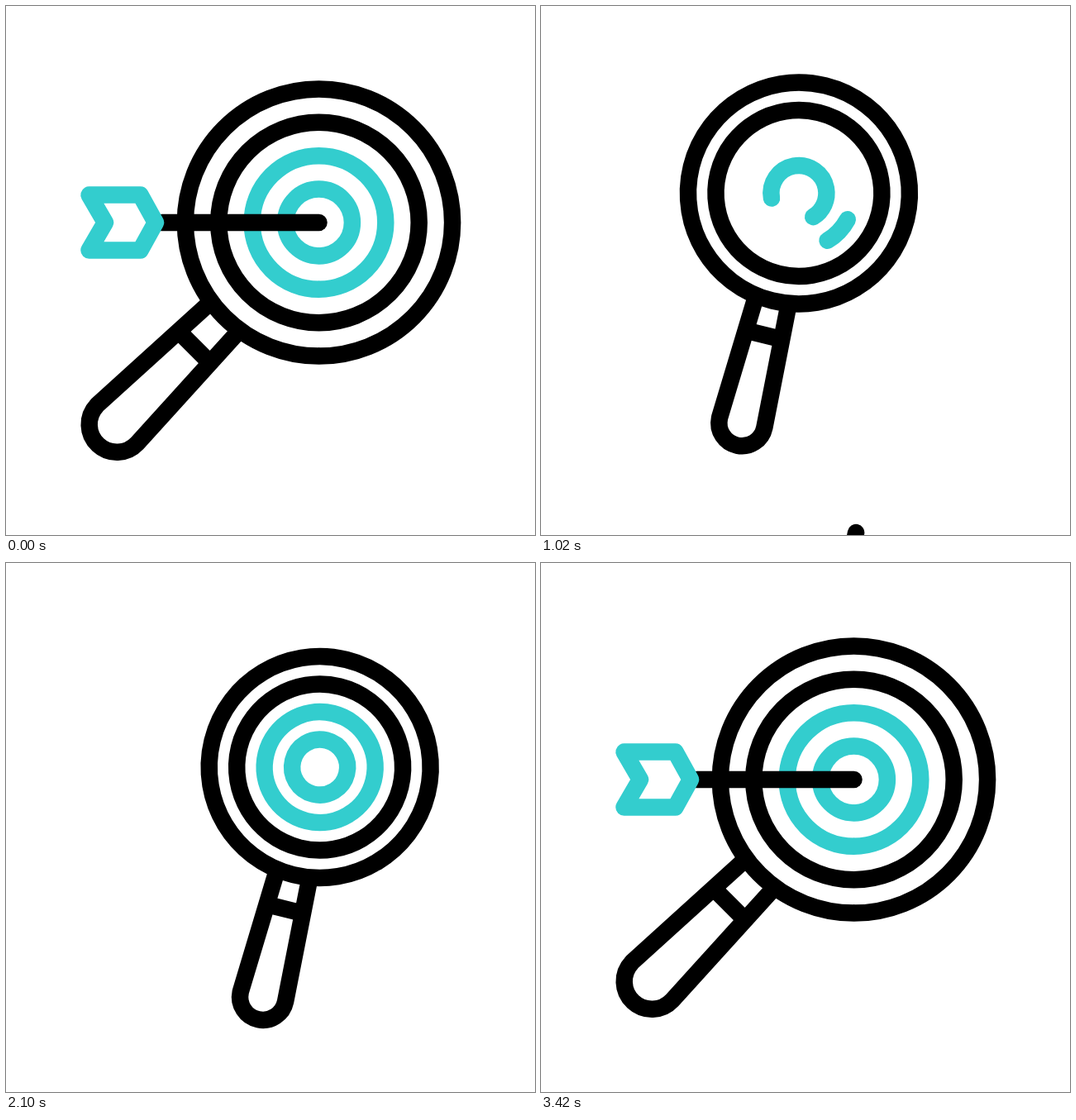
An HTML page with a canvas for the animation above (3.6 s loop, 640 px wide and 640 px high).

```html
<!DOCTYPE html>
<html lang="en">
<head>
<meta charset="utf-8">
<title>Magnifier and arrow</title>
<style>
  html, body { margin: 0; width: 100%; height: 100%; overflow: hidden; background: #fff; }
  canvas { display: block; }
</style>
</head>
<body>
<canvas id="stage" width="640" height="640"></canvas>
<script>
const ctx = document.getElementById('stage').getContext('2d');
const LOOP = 3600, BLACK = '#000', TEAL = '#33cdce', RAD = Math.PI / 180;
const REST = { x: 378.5, y: 262 };

// Key points of the lens centre, joined by a smooth curve
const route = [
  { t: 200, ...REST },
  { t: 480, x: 363.5, y: 235 },
  { t: 1020, x: 312, y: 226.5 },
  { t: 1300, x: 303, y: 207.5 },
  { t: 1660, x: 357, y: 189.5 },
  { t: 2020, x: 385, y: 239 },
  { t: 2540, x: 328.5, y: 277.5 },
  { t: 3040, x: 364, y: 260 },
  { t: 3400, ...REST }
];

// Eased progress from 0 to 1 between two times
function ease(t, from, to) {
  const u = Math.min(1, Math.max(0, (t - from) / (to - from)));
  return u * u * (3 - 2 * u);
}

function slope(i, axis) {
  const a = route[i - 1], b = route[i + 1];
  return a && b ? (b[axis] - a[axis]) / (b.t - a.t) : 0;
}

function along(t, axis) {
  const i = route.findIndex(p => p.t > t) - 1;
  if (i < 0) return REST[axis];
  const a = route[i], b = route[i + 1], d = b.t - a.t, u = (t - a.t) / d;
  const bend = slope(i, axis) * (1 - u) - slope(i + 1, axis) * u;
  return a[axis] + (b[axis] - a[axis]) * ease(t, a.t, b.t) + d * u * (1 - u) * bend;
}

function stroke(color, path, cap = 'round') {
  ctx.strokeStyle = color;
  ctx.lineCap = cap;
  ctx.beginPath();
  path();
  ctx.stroke();
}

function line(color, x1, y1, x2, y2, cap) {
  stroke(color, () => { ctx.moveTo(x1, y1); ctx.lineTo(x2, y2); }, cap);
}

// Part of a ring, measured clockwise from its lowest point
function ring(color, r, from = 0, to = 1) {
  if (to - from < 0.001) return;
  stroke(color, () => ctx.arc(0, 0, r, (90 + 360 * from) * RAD, (90 + 360 * to) * RAD));
}

// A ring that is wiped away and then drawn again
function wipedRing(t, r, start, middle, end) {
  if (t < middle) ring(TEAL, r, ease(t, start, middle), 1);
  else ring(TEAL, r, 0, ease(t, middle, end));
}

function drawLens(t) {
  const size = 1 - 0.171 * (ease(t, 200, 800) - ease(t, 2600, 3200));
  const turn = -31.1 * (ease(t, 200, 770) - ease(t, 2600, 3260));
  const unit = 40.4 * size;
  ctx.save();
  ctx.translate(along(t, 'x'), along(t, 'y'));
  ctx.rotate(turn * RAD);
  ring(BLACK, 4 * unit);
  ring(BLACK, 3 * unit);
  wipedRing(t, 2 * unit, 200, 1200, 1840);
  wipedRing(t, unit, 800, 1400, 1980);

  // Handle, pointing down in its own frame
  ctx.rotate(45 * RAD);
  stroke(BLACK, () => {
    ctx.moveTo(24.5 * size, 160 * size);
    ctx.arc(0, 345.5 * size, 33.5 * size, -2 * RAD, 182 * RAD);
    ctx.lineTo(-24.5 * size, 160 * size);
  }, 'butt');
  line(BLACK, -26 * size, 213 * size, 26 * size, 213 * size, 'butt');
  ctx.restore();
}

// The arrow's tip is the origin
function drawArrow(t) {
  const leave = ease(t, 400, 1200), enter = ease(t, 2800, 3020);
  ctx.save();
  if (t < 2000) {
    ctx.translate(REST.x + 3 * leave, REST.y + 430 * leave);
    ctx.rotate(-90 * leave * RAD);
  } else {
    ctx.translate(REST.x - 500 * (1 - enter), REST.y);
    ctx.rotate(90 * (1 - ease(t, 2680, 3080)) * RAD);
    const trail = 82 * (1 - ease(t, 3040, 3400));
    if (trail > 0.5) {
      line(TEAL, -174 - trail, -88, -174, -88);
      line(TEAL, -252 - trail, 90, -252, 90);
    }
  }
  line(BLACK, -190, 0, 0, 0);
  stroke(TEAL, () => {
    ctx.moveTo(-258.5, 0);
    ctx.lineTo(-278, -33.5);
    ctx.lineTo(-216, -33.5);
    ctx.lineTo(-197.5, 0);
    ctx.lineTo(-216, 33.5);
    ctx.lineTo(-278, 33.5);
    ctx.closePath();
  });
  ctx.restore();
}

function draw(now) {
  const t = now % LOOP;
  ctx.fillStyle = '#fff';
  ctx.fillRect(0, 0, 640, 640);
  ctx.lineWidth = 20.5;
  ctx.lineJoin = 'round';
  drawLens(t);
  if (t < 1300 || t > 2750) drawArrow(t);
  requestAnimationFrame(draw);
}

requestAnimationFrame(draw);
</script>
</body>
</html>
```
